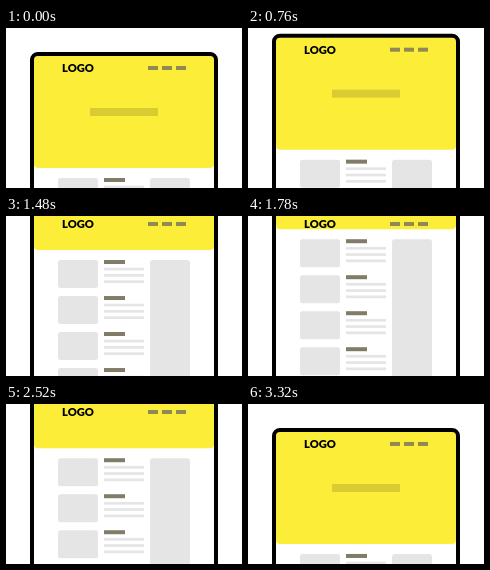
Recreate the animation shown at these times as an HTML page. Size 236 px wide and 160 px high, loop 3400 ms.

```html
<!DOCTYPE html>
<html lang="en">
<head>
<meta charset="utf-8">
<title>Scrolling page</title>
<style>
  html, body { margin: 0; width: 100%; height: 100%; overflow: hidden; background: #fff; }
  svg { display: block; width: 100%; height: 100%; }
  text { font: 900 11.2px Lato, sans-serif; }
</style>
</head>
<body>
<svg viewBox="0 0 236 160">
  <defs>
    <clipPath id="screen"><rect id="hole" x="28" y="28" width="180" height="300" rx="4"/></clipPath>
  </defs>
  <g clip-path="url(#screen)">
    <g id="page">
      <rect x="28" y="-160" width="180" height="300" rx="4" fill="#fcee38"/>
      <rect x="84" y="80" width="68" height="8" fill="#d8cc32"/>
      <rect x="144" y="150" width="40" height="300" rx="3" fill="#e5e5e5"/>
    </g>
    <g id="bar">
      <text x="56" y="44">LOGO</text>
    </g>
  </g>
  <rect id="frame" x="26" y="26" width="184" height="300" rx="6" fill="none" stroke="#000" stroke-width="4"/>
</svg>
<script>
const LOOP = 3400, LIFT = 32, SCROLL = 96;
const $ = id => document.getElementById(id);
const page = $('page'), bar = $('bar'), frame = $('frame'), hole = $('hole');

function box(parent, x, y, width, height, fill, rx = 0) {
  const r = document.createElementNS('http://www.w3.org/2000/svg', 'rect');
  for (const [k, v] of Object.entries({ x, y, width, height, fill, rx })) r.setAttribute(k, v);
  parent.appendChild(r);
}

for (let i = 0; i < 3; i++) box(bar, 142 + i * 14, 38, 10, 4, '#8f8a55');

for (let row = 0; row < 5; row++) {
  const y = 150 + row * 36;
  box(page, 52, y, 40, 28, '#e5e5e5', 2.5);
  box(page, 98, y, 21, 4, '#807c68');
  for (let i = 0; i < 3; i++) box(page, 98, y + 7.7 + i * 6.3, 40, 2.7, '#e5e5e5');
}

// Cubic ease in-out between two times
function ease(t, from, to) {
  const u = Math.min(1, Math.max(0, (t - from) / (to - from)));
  return u < 0.5 ? 4 * u ** 3 : 1 - 4 * (1 - u) ** 3;
}

function draw(t) {
  const lift = LIFT * (ease(t, 430, 1060) - ease(t, 2930, 3350));
  const scroll = SCROLL * (ease(t, 710, 1965) - ease(t, 1965, 3235));
  page.setAttribute('transform', `translate(0 ${-lift - scroll})`);
  bar.setAttribute('transform', `translate(0 ${-lift})`);
  frame.setAttribute('y', 26 - lift);
  hole.setAttribute('y', 28 - lift);
}

const start = performance.now();
function tick() {
  draw((performance.now() - start) % LOOP);
  requestAnimationFrame(tick);
}
tick();
</script>
</body>
</html>
```
